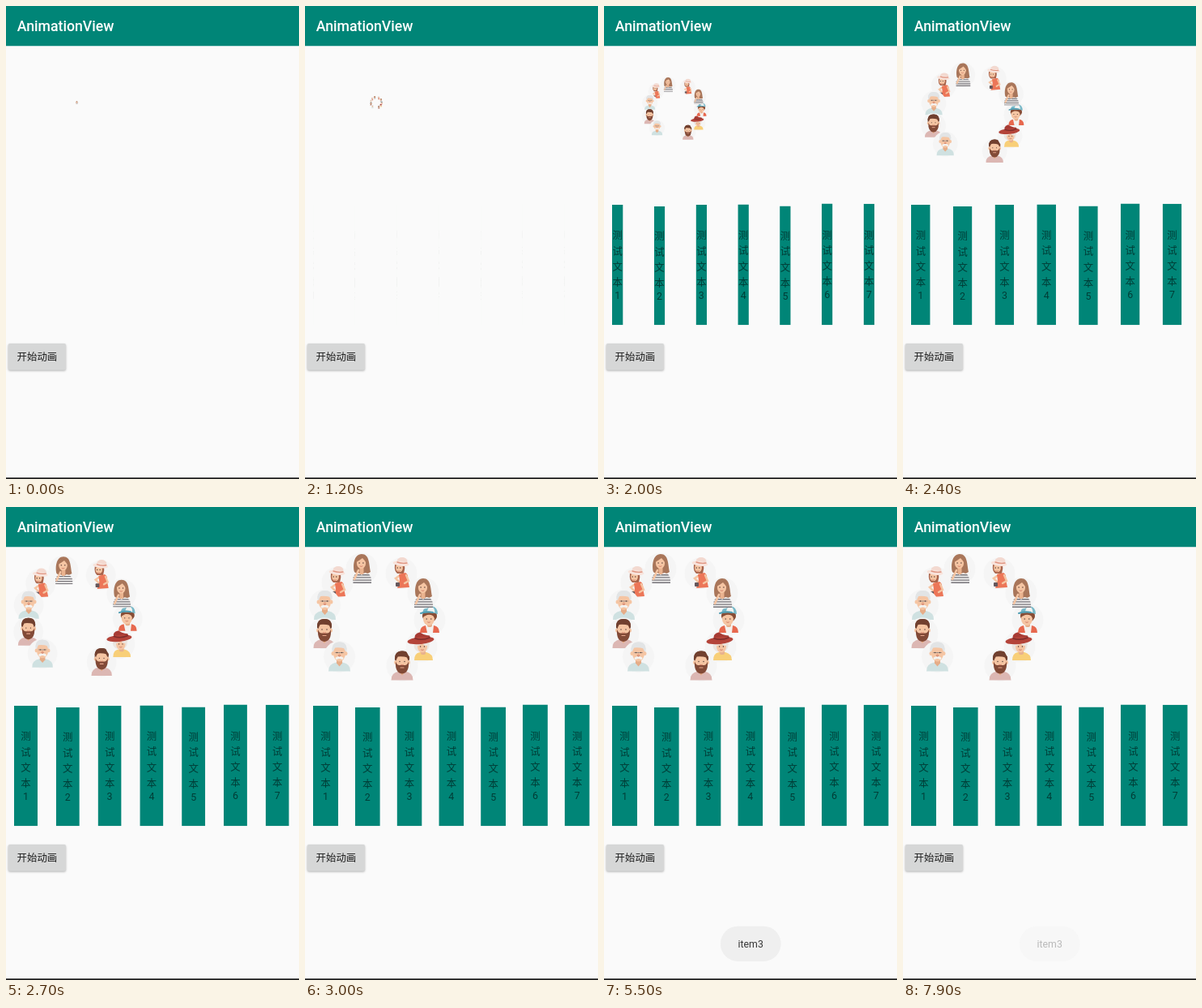
These frames come from a looping animation (362x583 px, 8000 ms). An HTML page with a canvas:

```html
<!DOCTYPE html>
<html lang="zh-CN">
<head>
<meta charset="utf-8">
<style>
  html, body { margin: 0; width: 100%; height: 100%; overflow: hidden; background: #fafafa; }
  canvas { display: block; width: 362px; height: 583px; }
</style>
</head>
<body>
<canvas id="stage"></canvas>
<script>
const W = 362, H = 583, LOOP = 8000;
const TEAL = '#008577', SKIN = '#f5c5a3';
const LATIN = 'Roboto, sans-serif';
const CJK = '"Noto Sans CJK SC", "Noto Sans CJK", sans-serif';

const canvas = document.getElementById('stage');
const ctx = canvas.getContext('2d');
const ratio = window.devicePixelRatio || 1;
canvas.width = W * ratio;
canvas.height = H * ratio;

const clamp = v => Math.min(1, Math.max(0, v));
const progress = (t, start, length) => clamp((t - start) / length);
const smooth = x => (1 - Math.cos(Math.PI * x)) / 2;

function rect(color, x, y, w, h, r = 0) {
  ctx.fillStyle = color;
  ctx.beginPath();
  ctx.roundRect(x, y, w, h, r);
  ctx.fill();
}

function oval(color, x, y, rx, ry = rx, angle = 0) {
  ctx.fillStyle = color;
  ctx.beginPath();
  ctx.ellipse(x, y, rx, ry, angle, 0, Math.PI * 2);
  ctx.fill();
}

function shape(color, path) {
  ctx.fillStyle = color;
  ctx.fill(new Path2D(path));
}

function line(color, width, path) {
  ctx.strokeStyle = color;
  ctx.lineWidth = width;
  ctx.lineCap = 'round';
  ctx.stroke(new Path2D(path));
}

function text(str, x, y, font, color, align = 'center') {
  ctx.font = font;
  ctx.fillStyle = color;
  ctx.textAlign = align;
  ctx.fillText(str, x, y);
}

function features(x, y, gap = 2.4) {
  oval('#4b3430', x - gap, y, 0.7);
  oval('#4b3430', x + gap, y, 0.7);
  line('#c96e5b', 0.8, `M${x - 1.4} ${y + 4}q1.4 1 2.8 0`);
}

// Portraits are drawn around 0,0 inside a disc of radius 19.5.
function stripedWoman() {
  shape('#a9765a', 'M-9 4C-11 -3 -10 -18 0 -18C10 -18 9 -5 11 4Q6 8 0 5Q-5 8 -9 4Z');
  rect('#eab38f', -2.5, -2, 5, 9);
  oval(SKIN, -0.5, -7, 5.6, 7);
  shape('#a9765a', 'M-7 -8Q-5 -16 1 -15Q7 -14 6 -7Q3 -11 1 -13Q-3 -10 -7 -8Z');
  features(-0.5, -7);
  const body = 'M-11 18Q-12 6 -4 5L0 8L4 5Q13 6 12 18Z';
  shape('#f1f0ef', body);
  ctx.save();
  ctx.clip(new Path2D(body));
  for (let y = 7; y < 19; y += 3.2) rect('#77757a', -13, y, 26, 1.4);
  ctx.restore();
  line(SKIN, 2.6, 'M-9 13L-4 2');
}

function hatGirl() {
  shape('#a9644c', 'M-8 -11Q-9 -3 -5 0L3 0Q5 -6 4 -13Z');
  line(SKIN, 2.6, 'M0 1L-7 6L-3 10');
  shape('#ec7658', 'M-3 1L5 -1Q9 1 8 7L10 17L-5 18L-2 9Z');
  line(SKIN, 2.4, 'M6 2L9 9L4 12');
  oval(SKIN, -2.5, -7, 4.4, 5.2);
  features(-3, -7, 1.8);
  oval('#f3d9d0', 1, -15, 6.5, 5);
  oval('#f8e3db', -0.5, -12.3, 10, 3, 0.12);
  line('#df937f', 1.4, 'M-5 -14Q1 -12 7 -13');
  rect('#65575b', -7, 11, 5, 5, 1);
}

function capBoy() {
  shape('#f4f1ee', 'M-12 16Q-12 8 -4 7L4 7Q12 8 12 16Z');
  shape('#e7684e', 'M-12 16Q-12 8 -5 7L-3 16ZM5 7Q12 8 12 16L4 16Z');
  rect('#e6ad88', -3, 3, 6, 6, 2);
  oval('#874d36', 0, -5, 9, 8);
  oval(SKIN, -1, -1, 7, 8);
  shape('#874d36', 'M-9 -3Q-9 -10 -2 -10Q6 -11 9 -3L6 -2Q4 -7 -3 -6Z');
  features(-1, -1, 2.8);
  shape('#79b9c8', 'M-9 -8Q-8 -17 2 -17Q10 -16 10 -7Q3 -10 -9 -8Z');
  shape('#f2f3f1', 'M-3 -9Q-3 -15 2 -17Q7 -14 6 -9Z');
  line('#4f9db3', 2, 'M-11 -8Q-3 -11 4 -9');
}

function redHatLady() {
  oval('#ebe5e0', 0, -1, 9.5, 8);
  shape('#f8cf78', 'M-9 17Q-9 8 -2 7L6 7Q14 9 14 17Z');
  rect('#e8b18d', -1, 3, 6, 7, 2);
  oval(SKIN, 1, 0, 6, 7.5);
  features(1, 0);
  oval('#ebe5e0', -5, -4, 4, 3);
  oval('#ebe5e0', 6, -4, 4, 3);
  oval('#a73b34', 1, -12, 9.5, 6);
  oval('#b4443a', -1, -7.5, 16.5, 4.4, -0.1);
  line('#7e2d2b', 1.6, 'M-8 -10Q1 -7 10 -11');
}

function man(hair, beard, shirt, white) {
  shape(shirt, 'M-13.5 18Q-14 9 -4 7L4 7Q14 9 13.5 18Z');
  shape('#e6ad88', 'M-3.5 4H3.5V8L0 12L-3.5 8Z');
  oval(hair, 0, -10, 9, 8);
  oval(SKIN, -8, -4, 2, 2.6);
  oval(SKIN, 8, -4, 2, 2.6);
  oval(SKIN, 0, -4, 7.5, 10);
  if (white) {
    line(beard, 3, 'M-3.5 2Q0 0 3.5 2');
    line('#8c8583', 0.8, 'M-5 -5h3.6M1.4 -5h3.6M-1.4 -5h2.8');
    oval('#e8a98a', 0, -2, 1.5, 2);
  } else {
    shape(beard, 'M-8 -5Q-6 0 -3 -0.5L3 -0.5Q6 0 8 -5Q9 9 0 10Q-9 9 -8 -5Z');
    line('#e6a58b', 1.2, 'M-2 2.5h4');
  }
  features(0, -5, 3);
  shape(hair, 'M-9 -6Q-10 -19 1 -18Q10 -18 9 -6L7 -10Q0 -12 -6 -11Z');
}

const beardedMan = () => man('#71402f', '#824a37', '#dcb7b3', false);
const oldMan = () => man('#e2e4e5', '#f4f3f1', '#cfe1e1', true);

const portraits = [
  [70, 76, stripedWoman], [40, 93, hatGirl], [24.5, 121, oldMan],
  [24, 156, beardedMan], [42.5, 184.5, oldMan], [120, 195.5, beardedMan],
  [144, 172, redHatLady], [154, 139, capBoy], [146, 106, stripedWoman],
  [119, 82, hatGirl]
];

function portrait(x, y, scale, figure) {
  ctx.save();
  ctx.translate(x, y);
  ctx.scale(scale, scale);
  oval('#f5f5f5', 0, 0, 19.5);
  figure();
  ctx.restore();
}

function drawRing(t, grow) {
  if (t < 1200) {
    portrait(87.5, 119, 0.1, stripedWoman);
    return;
  }
  const scale = 0.1 + 0.9 * grow;
  const px = 88, py = 117;
  for (const [x, y, figure] of portraits)
    portrait(px + (x - px) * scale, py + (y - py) * scale, scale, figure);
}

const barTops = [245, 247, 245, 244.5, 246.5, 243.5, 243.8];

function drawBars(grow) {
  const width = 31 * grow, bottom = 393.3, ink = 'rgba(0,0,0,.54)';
  if (width < 0.05) return;
  barTops.forEach((top, i) => {
    const x = 10 + i * 51.78, cx = x + width / 2, cy = (top + bottom) / 2;
    ctx.save();
    ctx.beginPath();
    ctx.rect(x, top, width, bottom - top);
    ctx.clip();
    rect(TEAL, x, top, width, bottom - top);
    [...'测试文本'].forEach((ch, row) =>
      text(ch, cx, cy - 31.8 + row * 19.2, `12.4px ${CJK}`, ink));
    text(String(i + 1), cx, cy + 41.8, `12.4px ${LATIN}`, ink);
    ctx.restore();
  });
}

function drawButton() {
  ctx.save();
  ctx.shadowColor = 'rgba(0,0,0,.28)';
  ctx.shadowBlur = 2.5 * ratio;
  ctx.shadowOffsetY = ratio;
  rect('#d6d7d7', 2.8, 416, 71.2, 32.7, 2);
  ctx.restore();
  text('开始动画', 38.4, 437, `12.4px ${CJK}`, 'rgba(0,0,0,.87)');
}

function drawToast(t, shown, hidden, fadeOut) {
  const rise = 1 - (1 - progress(t, shown, 500)) ** 2;
  const fall = progress(t, hidden, fadeOut) ** 2;
  const alpha = rise * (1 - fall);
  if (alpha <= 0) return;
  ctx.save();
  ctx.globalAlpha = alpha;
  rect('#efefef', 144, 516.7, 74.5, 43.3, 21.6);
  text('item3', 181.2, 543.4, `12.35px ${LATIN}`, '#303030');
  ctx.restore();
}

function draw(t) {
  const grow = smooth(progress(t, 1150, 1850));
  ctx.setTransform(ratio, 0, 0, ratio, 0, 0);
  rect('#fafafa', 0, 0, W, H);
  rect(TEAL, 0, 0, W, 49.3);
  text('AnimationView', 13.8, 31.4, `500 17.7px ${LATIN}`, '#fff', 'left');
  drawRing(t, grow);
  drawBars(grow);
  drawButton();
  drawToast(t, 3618, 5100, 500);
  drawToast(t, 5100, 6900, 500);
  drawToast(t, 7818, LOOP, 500);
  rect('#1c1c1c', 0, 581.3, W, 1.7);
}

const start = performance.now();
function tick() {
  draw((performance.now() - start) % LOOP);
  requestAnimationFrame(tick);
}
tick();
</script>
</body>
</html>
```
